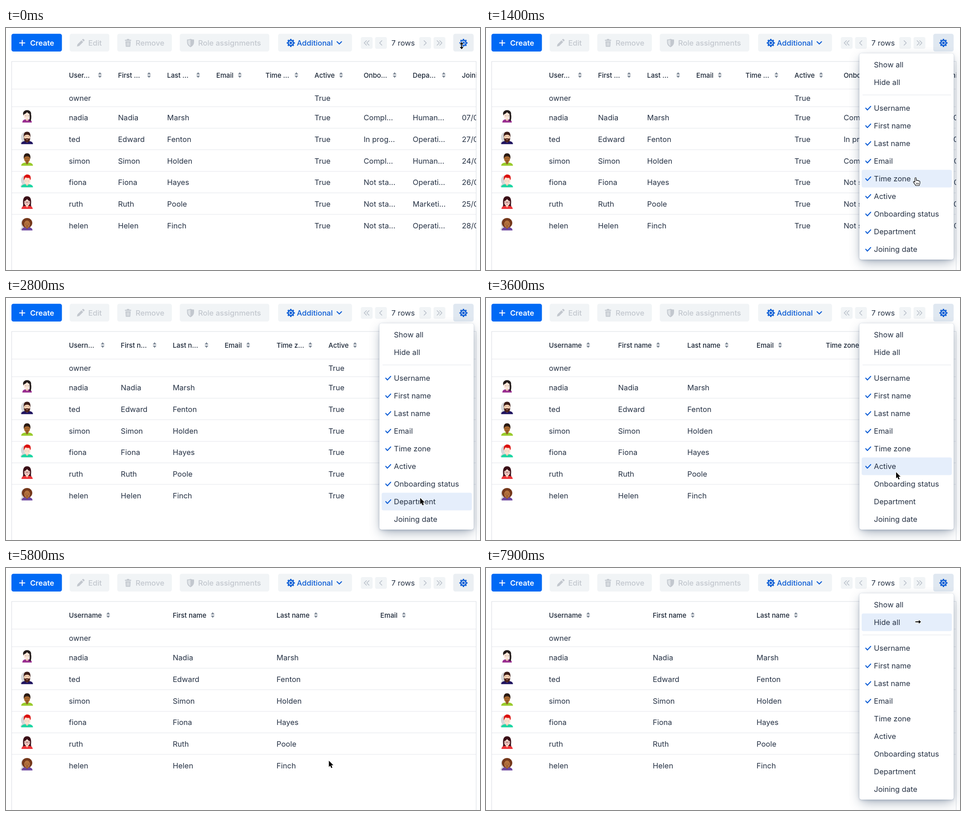
Write an HTML page that moves like this. It is 1046x535 px and loops after 8 s.

```html
<!DOCTYPE html>
<html lang="en">
<head>
<meta charset="utf-8">
<title>User list</title>
<style>
html, body { margin: 0; width: 100%; height: 100%; overflow: hidden; background: #fff; }
#stage { position: relative; width: 1046px; height: 535px; overflow: hidden; }
svg { position: absolute; left: 0; top: 0; overflow: visible; }
text { font: 400 16.5px Inter, "Open Sans", sans-serif; fill: #263245; white-space: pre; }
.head { font-size: 14.8px; font-weight: 500; fill: #1b2636; }
.btn { font-weight: 500; }
.off { fill: #c2c7ce; }
.blue { fill: #0b5cd5; }
.white { fill: #fff; font-weight: 600; }
.line { fill: none; stroke-linecap: round; stroke-linejoin: round; }
#panel {
  position: absolute; left: 824px; top: 56px; width: 208px; height: 456px;
  border-radius: 5px; background: #fff;
  box-shadow: 0 0 0 1px rgba(25, 59, 103, .06), 0 2px 6px -1px rgba(25, 55, 95, .22),
    0 9px 26px -4px rgba(24, 50, 84, .42);
}
#panel svg { left: -824px; top: -56px; }
</style>
</head>
<body>
<div id="stage">
  <svg id="page" width="1046" height="535"></svg>
  <div id="panel"><svg id="menu" width="1046" height="535"></svg></div>
  <svg id="pointer" width="1046" height="535"></svg>
</div>
<script>
const LOOP = 8000, STEP = 100;
const byId = id => document.getElementById(id);

// name, narrow label, medium label, time it gets hidden
const columns = [
  ['Username', 'User…', 'Usern…'],
  ['First name', 'First …', 'First n…'],
  ['Last name', 'Last …', 'Last n…'],
  ['Email', 'Email', 'Email'],
  ['Time zone', 'Time …', 'Time z…', 4600],
  ['Active', 'Active', 'Active', 4000],
  ['Onboarding status', 'Onbo…', 'Onbo…', 3400],
  ['Department', 'Depa…', 'Depar…', 3000],
  ['Joining date', 'Joini…', 'Joinin…', 2200],
].map(([name, narrow, medium, hideAt = Infinity]) => ({ name, narrow, medium, hideAt }));

const user = (nick, first, last, status, dept, day) =>
  [nick, first, last, '', '', 'True', status, dept, day];
const rows = [
  user('owner', '', '', '', '', ''),
  user('nadia', 'Nadia', 'Marsh', 'Compl…', 'Human…', '07/0…'),
  user('ted', 'Edward', 'Fenton', 'In prog…', 'Operati…', '27/0…'),
  user('simon', 'Simon', 'Holden', 'Compl…', 'Human…', '24/0…'),
  user('fiona', 'Fiona', 'Hayes', 'Not sta…', 'Operati…', '26/0…'),
  user('ruth', 'Ruth', 'Poole', 'Not sta…', 'Marketi…', '25/0…'),
  user('helen', 'Helen', 'Finch', 'Not sta…', 'Operati…', '28/0…'),
];
const rowY = i => i ? 150.4 + 47.7 * i : 155;

// cursor: time, x, y, shape from that time on
const path = [
  [0, 1005.5, 39, 'ns'], [100, 1007, 36, 'hand'], [600, 1007, 34, 'hand'],
  [800, 1006, 38, 'hand'], [900, 1004, 45, 'hand'], [1000, 1004, 45, 'hand'],
  [1400, 948, 331, 'hand'], [1900, 915, 492, 'hand'], [2300, 915, 492, 'hand'],
  [2800, 914, 442, 'arrow'], [3000, 914, 442, 'hand'], [3300, 908, 412, 'hand'],
  [3400, 908, 412, 'hand'], [3600, 905, 385, 'arrow'], [3900, 905, 378, 'hand'],
  [4100, 905, 378, 'hand'], [4500, 893, 334, 'hand'], [5200, 893, 334, 'hand'],
  [5500, 712.5, 426, 'arrow'], [6000, 712.5, 426, 'arrow'], [6700, 1000, 38, 'arrow'],
  [6900, 1008, 24, 'hand'], [7300, 1008, 26, 'hand'], [7900, 953.5, 119, 'east'],
  [8000, 953.5, 119, 'east'],
];
const fade = [[0, 0], [300, .5], [400, 1], [5600, .4], [5700, 0], [7300, .5], [7400, 1]];

const text = (x, y, s, cls = '') => `<text x="${x}" y="${y}" class="${cls}">${s}</text>`;
const rect = (x, y, w, h, fill, r = 0, more = '') =>
  `<rect x="${x}" y="${y}" width="${w}" height="${h}" rx="${r}" fill="${fill}" ${more}/>`;
const shape = (d, fill) => `<path d="${d}" fill="${fill}"/>`;
const line = (d, color, w) =>
  `<path class="line" d="${d}" stroke="${color}" stroke-width="${w}"/>`;
const oval = (x, y, rx, ry, fill) =>
  `<ellipse cx="${x}" cy="${y}" rx="${rx}" ry="${ry}" fill="${fill}"/>`;
const move = (x, y, s) => `<g transform="translate(${x} ${y})">${s}</g>`;

const gear = (x, y) => move(x, y, `<g fill="none" stroke="#0b5cd5">
  <circle r="5.8" stroke-width="2.8"/>
  <circle r="7.9" stroke-width="2.2" pathLength="16" stroke-dasharray="1 1"
    transform="rotate(-11.25)"/></g>` + oval(0, 0, 2.8, 2.8, '#0b5cd5'));

function toolbar() {
  const soft = '#f1f4f6', gray = '#c2c7ce';
  const button = (x, w, fill, label, tx, cls) =>
    rect(x, 12.7, w, 39.3, fill, 4.5) + text(tx, 39, label, 'btn ' + cls);
  const pager = (x, d) => rect(x, 20, 26, 26, soft, 4) + move(x + 13, 33, line(d, '#b7bec8', 1.6));
  return button(12, 111.4, '#006af5', 'Create', 53.2, 'white') +
    line('M30 33h11.5M35.75 27.2v11.6', '#fff', 2.1) +
    button(140.5, 87.5, soft, 'Edit', 181.5, 'off') +
    shape('M156.5 41l1.2-5 8.8-8.8 3.8 3.8-8.8 8.8zM167.6 26l1.6-1.6q1-.8 2 0l1.8 1.8q.8 1 0 2l-1.6 1.6z', gray) +
    button(245.5, 120.5, soft, 'Remove', 286, 'off') +
    shape('M262.5 26h4.2v-1.8h5.2v1.8h4.2v2.2h-13.6zM263.6 29.5h11.4l-.8 12h-9.8z', gray) +
    line('M267 32v7M269.3 32v7M271.6 32v7', soft, 1) +
    button(383.5, 197.5, soft, 'Role assignments', 424, 'off') +
    shape('M399.5 25.5q5 0 7.7-1.5 3 1.5 7.8 1.5v5.5q0 7.5-7.8 11.5-7.7-4-7.7-11.5z', gray) +
    shape('M401.3 27q3.5 0 5.7-1v14.3q-5.7-3.3-5.7-9.3z', '#e0e4e8') +
    button(600.5, 163, soft, 'Additional', 641.8, 'blue') +
    gear(628.5, 33) + line('M730.5 30.3l5 5 5-5', '#0b5cd5', 2.2) +
    pager(783, 'M-.5-5l-5 5 5 5M5.2-5l-5 5 5 5') + pager(814.5, 'M2-5l-5 5 5 5') +
    text(850.5, 39, '7 rows') +
    pager(912, 'M-2.5-5l5 5-5 5') + pager(943.5, 'M-5.2-5l5 5-5 5M.5-5l5 5-5 5') +
    rect(987, 12.7, 45, 39.3, '#ebeff3', 4.5, 'id="gearBack"') + gear(1009.5, 33);
}

// flat portraits on a 28 px box centred on 0,0
const body = (fill, w = 13) => shape(`M${-w} 14q0-6 ${w - 4}-7h8q${w - 4} 1 ${w - 4} 7z`, fill);
const neck = fill => shape('M-2.8 3h5.6v5l-2.8 3-2.8-3z', fill);
const shade = oval(-5, -1, 8.5, 11, '#d5d7da') + shape('M-15 13q1-7 9-7l6 7z', '#d5d7da');
const eyes = (y, color = '#3a211b') => oval(-2.6, y, .8, .6, color) + oval(2.6, y, .8, .6, color);
const cap = color => shape('M-7.2-1q-1.500-12.500 7.200-12.500t7.200 12.500l-1.500-4q-5.700-4-11.400 0z', color);
const portraits = [
  oval(0, -6, 9, 7.5, '#241c1b') + body('#9a2f91', 10.5) + neck('#f2cdb8') +
    oval(-.5, -1.5, 6.8, 8, '#fde6d8') + shape('M-8-4q1-7 8-8 8 1 8 7-5 0-8-4-3 4-8 5z', '#241c1b') +
    line('M7-4q1.500 6-.5 13', '#241c1b', 3.5) + eyes(-1),
  shade + body('#1f1460') + neck('#e2aa82') + oval(0, -2, 6.7, 9, '#f9d3b4') + cap('#3b1c17') +
    shape('M-6.800-1l1.800 3q5-2 10 0l1.800-3q1 10-6.800 11-7.800-1-6.800-11z', '#4a2219') +
    eyes(-3) + oval(0, 4, 2, .7, '#e79c8c'),
  body('#9acb2c') + neck('#8c5527') + oval(0, -2, 6.7, 8.7, '#a9692f') + cap('#2a1b14') +
    eyes(-2) + oval(0, 3.5, 2, .7, '#5c3018'),
  shade + body('#1fd5a3') + neck('#f3c5ad') + oval(.5, -.5, 6.7, 8.3, '#fee0cf') +
    shape('M-7-1q-1-7 1-10 4-5 9-3 6 1 5 10l-1 2-2-5q-5 1-8-1-2 1-4 7z', '#dc1210') + eyes(0, '#b98a7c'),
  shape('M-9.500 9q1.500-4 .5-10 0-13 9-13t9 13q-1 6 .5 10z', '#3b0f18') + body('#ee3439', 12.5) +
    neck('#f0c4b2') + oval(0, -1, 6.7, 8, '#fde2d5') +
    shape('M-7-3q0-8 7-9 7 1 7 9-5-1-7-5-2 4-7 5z', '#3b0f18') +
    line('M-5.500-2h4.500v3h-4.500zM1-2h4.500v3h-4.500zM-1-1h2', '#8c4a52', .8) + oval(0, 4, 1.8, .7, '#d8364a'),
  shade + oval(0, -2.5, 11.5, 11, '#75381b') + body('#6c479f', 12) + neck('#8f5127') +
    oval(0, 0, 6.5, 8, '#b4713c') + eyes(0) + oval(0, 4.2, 1.9, .8, '#6d2c1c'),
];

const pen = document.createElement('canvas').getContext('2d');
pen.font = '500 14.8px Inter, "Open Sans", sans-serif';

function grid(shown) {
  const n = shown.length, width = Math.max(108.4, 916.4 / n);
  let out = '';
  shown.forEach((col, i) => {
    const x = 138.8 + i * width;
    const label = n > 8 ? col.narrow : n > 7 ? col.medium : col.name;
    // a shortened label pushes its sort arrows to the cell edge
    const sortX = label === col.name ? x + pen.measureText(label).width + 14 : x + width - 40;
    out += text(x, 109.5, label, 'head') +
      move(sortX, 104, shape('M-4.2-1.3l4.2-5 4.2 5zM-4.2 1.3l4.2 5 4.2-5z', '#7e8997'));
    const k = columns.indexOf(col);
    rows.forEach((row, r) => { if (row[k]) out += text(x, rowY(r) + 6, row[k]); });
  });
  return out;
}

const itemY = i => i < 2 ? 81 + 39 * i : 99 + 39 * i;
function menuItems(shown, x, y) {
  const labels = ['Show all', 'Hide all', ...columns.map(c => c.name)];
  return rect(831, 147.5, 195, 1, '#e2e6eb') + labels.map((label, i) => {
    const cy = itemY(i);
    const over = x > 829 && x < 1028 && Math.abs(y - cy) < 19.5;
    const ticked = i > 1 && shown.includes(columns[i - 2]);
    return (over ? rect(829, cy - 19.5, 199, 39, '#e5eefb', 4) : '') +
      (ticked ? line(`M838 ${cy}l3.6 4.2 7.4-8`, '#0b5cd5', 2.1) : '') +
      text(856, cy + 6, label);
  }).join('');
}

const outline = d => `<path d="${d}" stroke="#fff" stroke-width="2" stroke-linejoin="round"
  paint-order="stroke" fill="#000"/>`;
const cursors = {
  arrow: outline('M0 0V13.8L3 10.9 5.3 16.3 7.8 15.2 5.5 9.9H9.8Z'),
  ns: outline('M0-8l4.2 5H1V3h3.2L0 8-4.2 3H-1V-3h-3.2z'),
  east: outline('M-6-1H1.5V-4L6.5 0 1.5 4V1H-6z'),
  hand: `<path d="M-1.5 1.2C-1.5-.8 1.4-.8 1.4 1.2V6.2C1.6 5 4 5 4.2 6.6 4.8 5.6 6.8 6 6.9 7.4
    7.6 6.8 9.6 7 9.6 8.8V12C9.6 14 8.3 15 8 17.5H.2C-.2 15.5-3 13-4.6 10.4-5.8 8.6-3.6 7.4-2.4 8.8
    L-1.5 9.8Z" fill="#fff" stroke="#000" stroke-width="1.1" stroke-linejoin="round"/>` +
    line('M1.8 11.5v3.5M4.1 11.5v3.5M6.4 11.5v3.5', '#000', .9),
};

const lastKey = (table, t) => table.findLastIndex(k => k[0] <= t);
function cursorAt(t) {
  const i = lastKey(path, t), a = path[i], b = path[i + 1] || a;
  const p = b === a ? 0 : (t - a[0]) / (b[0] - a[0]), e = p * p * (3 - 2 * p);
  return [a[1] + (b[1] - a[1]) * e, a[2] + (b[2] - a[2]) * e, a[3]];
}

byId('page').innerHTML =
  '<clipPath id="inside"><rect x="13" y="75" width="1024.5" height="460"/></clipPath>' + toolbar() +
  rect(12.5, 74, 1025, 480, '#fff', 0, 'stroke="#d9dde3"') +
  [134.5, 173.5, 221, 268.5, 316.5, 364, 411.5].map(y => rect(13, y, 1024, 1, '#e3e6eb')).join('') +
  portraits.map((p, i) => move(46.5, rowY(i + 1) - 3, p)).join('') +
  '<g id="cells" clip-path="url(#inside)"></g>';

let drawnCount = 0;
function draw(now) {
  const t = Math.floor(now % LOOP / STEP) * STEP;
  const shown = columns.filter(c => t < c.hideAt);
  const [x, y, kind] = cursorAt(t);
  const opacity = fade[lastKey(fade, t)][1];
  if (shown.length !== drawnCount) {
    byId('cells').innerHTML = grid(shown);
    drawnCount = shown.length;
  }
  byId('gearBack').setAttribute('fill', opacity ? '#e0e8f1' : '#ebeff3');
  byId('panel').style.opacity = opacity;
  byId('menu').innerHTML = opacity ? menuItems(shown, x, y) : '';
  byId('pointer').innerHTML = move(x, y, cursors[kind]);
}

const start = performance.now();
function tick() {
  draw(performance.now() - start);
  requestAnimationFrame(tick);
}
tick();
</script>
</body>
</html>
```
